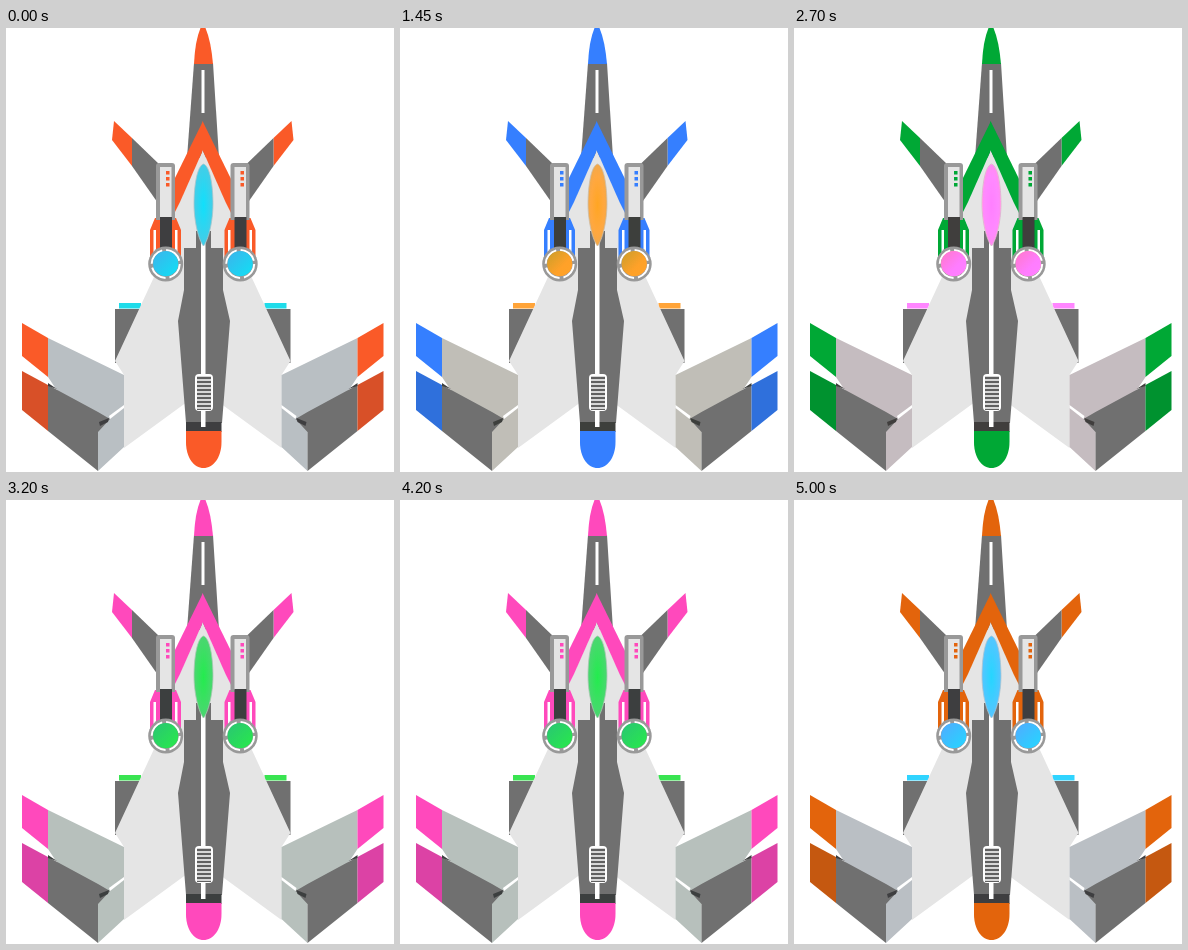
Animation of 388 by 444 pixels, one loop 5.05 s. Source, as an HTML page:

```html
<!DOCTYPE html>
<html lang="en">
<head>
<meta charset="utf-8">
<title>Colour-shifting jet</title>
<style>
  html, body { margin: 0; width: 100%; height: 100%; overflow: hidden; background: #fff; }
  svg { display: block; width: 388px; height: 444px; }
  .accent { fill: #fa5a28; }
  .shade { fill: #d85028; }
  .dark { fill: #707070; }
  .light { fill: #e5e5e5; }
  .panel { fill: #b9bfc3; }
  .coal { fill: #3e3e40; }
  .white { fill: #fff; }
  .cyan { fill: #1fdcea; }
</style>
</head>
<body>
<svg id="jet" viewBox="0 0 388 444">
  <defs>
    <radialGradient id="glass">
      <stop offset="0" stop-color="#10e0fc"/>
      <stop offset="1" stop-color="#46cce6"/>
    </radialGradient>
    <linearGradient id="lens" x1="0.1" y1="0.1" x2="0.9" y2="0.9">
      <stop offset="0" stop-color="#38b8ec"/>
      <stop offset="1" stop-color="#14dcf4"/>
    </linearGradient>

    <g id="wing">
      <path class="accent" d="M108 93L126 110V138L106 112Z"/>
      <path class="dark" d="M126 110L154 137V178L126 138Z"/>
      <path class="dark" d="M109 281H138V335H109Z"/>
      <path class="cyan" d="M113 275H135V280.5H113Z"/>
      <path class="light" d="M197 122L168 186V215L148 249L109 333L118 347V420L181 374H197Z"/>
      <path class="accent" d="M197 93L166 156V190L174 174L197 122Z"/>
      <path class="panel" d="M42 310L118 347V419L92 443V404L50 361L42 349Z"/>
      <path class="accent" d="M16 295L42 310V349L16 328Z"/>
      <path class="dark" d="M42 357L92 384L104 391L92 404V443L42 403Z"/>
      <path class="shade" d="M16 343L42 357V403L16 382Z"/>
      <path class="coal" d="M42 355L51 361L42 358ZM93 394L103 390L102 394L94 398Z"/>
      <path class="white" d="M103 388L118 377V380L104 391Z"/>
    </g>

    <g id="pod">
      <path class="accent" d="M149 190H170L175 202V230H144V202Z"/>
      <path class="white" d="M147.5 202H150V226H147.5ZM169 202H171.5V226H169Z"/>
      <path fill="#999" d="M150 192V138Q150 135 153 135H166Q169 135 169 138V192Z"/>
      <path class="light" d="M154 190V139H165.5V190Z"/>
      <path class="coal" d="M154 189H166V220H154Z"/>
      <path class="accent" d="M160 143H163.5V146.5H160ZM160 149H163.5V152.5H160ZM160 155H163.5V158.5H160Z"/>
      <circle cx="159.7" cy="236" r="17.5" fill="#999"/>
      <circle cx="159.7" cy="236" r="14" fill="none" stroke="#fff" stroke-width="2" stroke-dasharray="18 4"/>
      <circle cx="159.7" cy="235.7" r="12.6" fill="url(#lens)"/>
    </g>
  </defs>

  <path class="dark" d="M188 35H207L213 130H181Z"/>
  <path class="accent" d="M194.5 0H199.5Q205 13 207 36H188Q189 13 194.5 0Z"/>
  <path class="white" d="M195.5 42H198.5V85H195.5Z"/>

  <use href="#wing"/>
  <use href="#wing" transform="translate(393.5 0) scale(-1 1)"/>

  <path class="dark" d="M190 203H205V220H217V262L224 293L216 395H180L172 293L178 262V220H190Z"/>
  <path class="coal" d="M180 394H215.5V404H180Z"/>
  <path class="accent" d="M180 403H215.5V414C215.5 430 207 440 197.5 440S180 430 180 414Z"/>
  <path class="white" d="M195 214H199.5V399H195Z"/>
  <rect class="white" x="189" y="346" width="18" height="37" rx="4"/>
  <path d="M198 348.800V382" stroke="#606060" stroke-width="14" stroke-dasharray="2.4 1.6"/>
  <path fill="url(#glass)" stroke="#a9c6cc" stroke-width="0.8" d="M197.5 136C204 138 207 158 207 176C207 194 202 213 197.5 218C193 213 188 194 188 176C188 158 191 138 197.5 136Z"/>

  <use href="#pod"/>
  <use href="#pod" x="74.5"/>
</svg>
<script>
  const LOOP = 5050, STEP = 50, DELAY = 38, DEG_PER_MS = 0.36;
  const jet = document.getElementById("jet");
  const start = performance.now();

  function draw(now) {
    const time = Math.max(0, now - start) % LOOP;
    const tick = Math.floor(time / STEP) * STEP;
    const angle = -DEG_PER_MS * Math.max(0, tick - DELAY) % 360;
    jet.style.filter = `hue-rotate(${angle}deg)`;
    requestAnimationFrame(draw);
  }
  draw(start);
</script>
</body>
</html>
```
